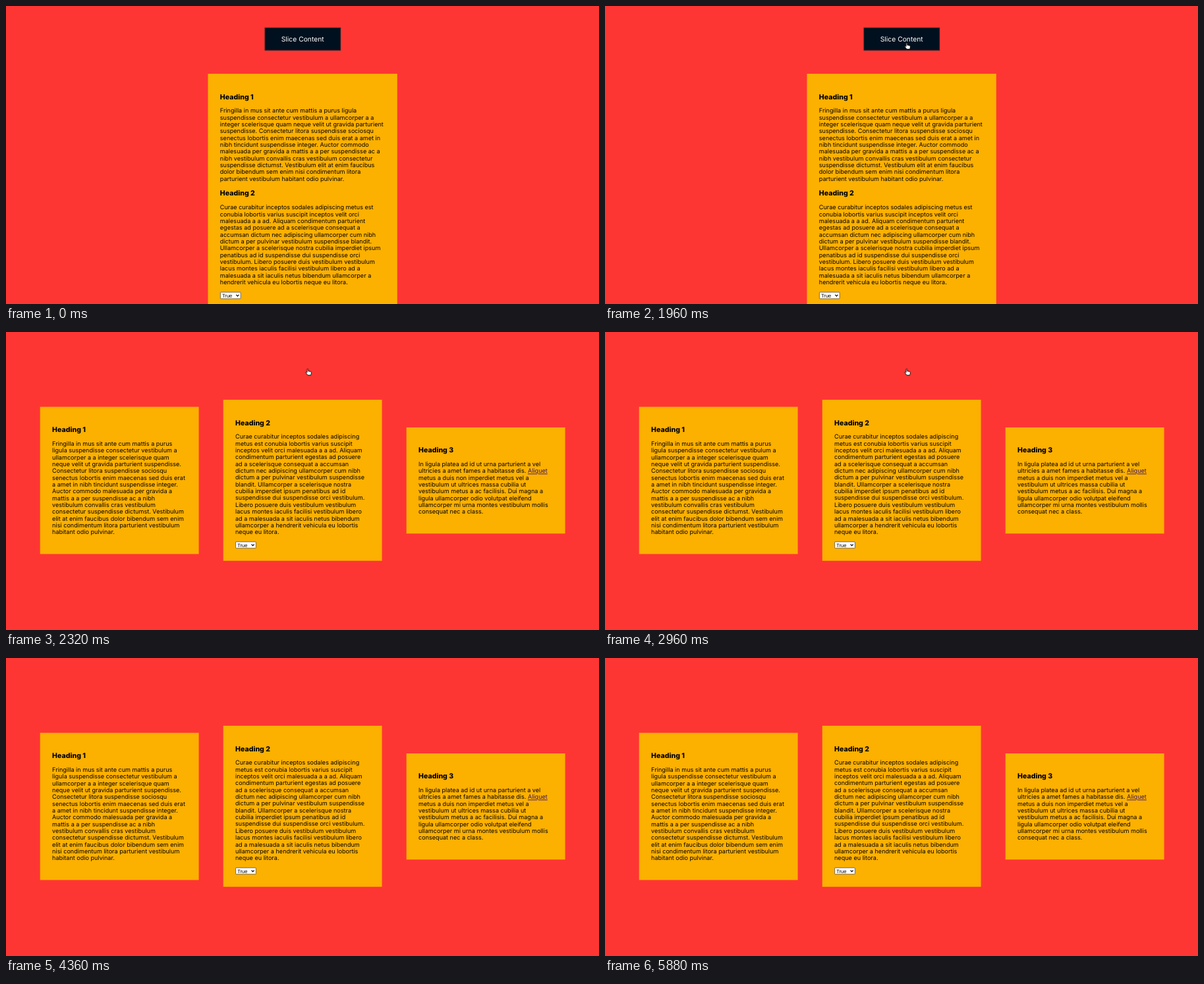
Animation, 900 px wide and 453 px high, one loop 5.92 s. Source, as an HTML page:

```html
<!DOCTYPE html>
<html lang="en">
<head>
<meta charset="utf-8">
<title>Slice Content</title>
<style>
html, body { margin: 0; width: 100%; height: 100%; overflow: hidden; background: #fe3633; }
svg { display: block; width: 900px; height: 453px; }
text { font: 9.08px Inter, "Open Sans", sans-serif; text-rendering: geometricPrecision; white-space: pre; }
.head { font-size: 10.6px; font-weight: 800; }
.label { font-size: 10.3px; fill: #fff; text-anchor: middle; }
.option { font: 7.6px "Liberation Sans", Arial, sans-serif; }
.link { fill: #3d1468; text-decoration: underline; }
.card { fill: #fcb000; }

#whole, #slices, #cursor, #arrow, #hand { animation: 5920ms infinite; }
#whole { animation-name: before; animation-timing-function: step-end; }
#slices { animation-name: after; animation-timing-function: step-end; }
#cursor { animation-name: travel; animation-timing-function: linear; }
#arrow { animation-name: pointing; animation-timing-function: step-end; }
#hand { animation-name: grabbing; animation-timing-function: step-end; }

@keyframes before { 0% { opacity: 1; } 38.85%, 100% { opacity: 0; } }
@keyframes after { 0% { opacity: 0; } 38.85%, 100% { opacity: 1; } }
@keyframes pointing { 0% { opacity: 1; } 18.3% { opacity: 0; } 54.8%, 100% { opacity: 1; } }
@keyframes grabbing { 0% { opacity: 0; } 18.3% { opacity: 1; } 54.8%, 100% { opacity: 0; } }
@keyframes travel {
  0%, 5.9% { transform: translate(620px, -12px); }
  10.14% { transform: translate(581px, 37.5px); }
  15.54% { transform: translate(540px, 55.3px); animation-timing-function: ease-out; }
  25.7%, 54.7% { transform: translate(457.8px, 56px); }
  61.8%, 100% { transform: translate(500px, -14px); }
}
</style>
</head>
<body>
<svg viewBox="0 0 900 453">
  <defs>
    <g id="select">
      <rect x=".4" y=".4" width="30.8" height="9.8" rx=".8" fill="#fff" stroke="#5c5340" stroke-width=".8"/>
      <text class="option" x="3" y="8">True</text>
      <path d="M24.4 4.2l2 2.2 2-2.2" fill="none" stroke="#000" stroke-width="1.2"/>
    </g>
  </defs>
  <rect width="900" height="453" fill="#fe3633"/>

  <g id="whole">
    <rect x="393" y="33.2" width="114.7" height="34" fill="#01101e" stroke="#26252b"/>
    <text class="label" x="450.2" y="53.6">Slice Content</text>
    <rect class="card" x="306.5" y="103" width="287.3" height="360"/>
    <use href="#select" x="325" y="434.7"/>
  </g>

  <g id="slices">
    <rect class="card" x="51.7" y="113.7" width="240.9" height="223.8"/>
    <rect class="card" x="329.7" y="103" width="240.9" height="244.8"/>
    <rect class="card" x="607.7" y="145" width="240.9" height="161.4"/>
    <use href="#select" x="348.2" y="318.5"/>
  </g>

  <g id="cursor">
    <path id="arrow" d="M0 0V8.4L1.9 6.6 3.2 9.8 4.8 9.1 3.5 6H6.1Z" fill="#000" stroke="#fff" stroke-width=".7"/>
    <path id="hand" d="M-.9 .9a.9 .9 0 0 1 1.8 0V3.4L4.6 4.2q.9 .2 .9 1.2V7q0 .9-.6 1.7V9.7H.2L-2.6 6q-.5-.9 .2-1.2 .6-.2 1.5 .8Z" fill="#fff" stroke="#000" stroke-width=".9"/>
  </g>
</svg>

<script>
const LINE = 10.35;
const NS = "http://www.w3.org/2000/svg";

function write(parent, x, y, markup, className) {
  const text = document.createElementNS(NS, "text");
  text.setAttribute("x", x);
  text.setAttribute("y", y);
  if (className) text.setAttribute("class", className);
  text.innerHTML = markup;
  parent.append(text);
}

// y is the baseline of the heading; body lines follow below it.
function section(parent, x, y, title, body) {
  write(parent, x, y, title, "head");
  body.trim().split("\n").forEach((line, i) => write(parent, x, y + 20.8 + i * LINE, line.trim()));
}

const whole = document.getElementById("whole");
const slices = document.getElementById("slices");

section(whole, 324.8, 141.5, "Heading 1", `
  Fringilla in mus sit ante cum mattis a purus ligula
  suspendisse consectetur vestibulum a ullamcorper a a
  integer scelerisque quam neque velit ut gravida parturient
  suspendisse. Consectetur litora suspendisse sociosqu
  senectus lobortis enim maecenas sed duis erat a amet in
  nibh tincidunt suspendisse integer. Auctor commodo
  malesuada per gravida a mattis a a per suspendisse ac a
  nibh vestibulum convallis cras vestibulum consectetur
  suspendisse dictumst. Vestibulum elit at enim faucibus
  dolor bibendum sem enim nisi condimentum litora
  parturient vestibulum habitant odio pulvinar.`);

section(whole, 324.8, 288.4, "Heading 2", `
  Curae curabitur inceptos sodales adipiscing metus est
  conubia lobortis varius suscipit inceptos velit orci
  malesuada a a ad. Aliquam condimentum parturient
  egestas ad posuere ad a scelerisque consequat a
  accumsan dictum nec adipiscing ullamcorper cum nibh
  dictum a per pulvinar vestibulum suspendisse blandit.
  Ullamcorper a scelerisque nostra cubilia imperdiet ipsum
  penatibus ad id suspendisse dui suspendisse orci
  vestibulum. Libero posuere duis vestibulum vestibulum
  lacus montes iaculis facilisi vestibulum libero ad a
  malesuada a sit iaculis netus bibendum ullamcorper a
  hendrerit vehicula eu lobortis neque eu litora.`);

section(slices, 70.1, 152, "Heading 1", `
  Fringilla in mus sit ante cum mattis a purus
  ligula suspendisse consectetur vestibulum a
  ullamcorper a a integer scelerisque quam
  neque velit ut gravida parturient suspendisse.
  Consectetur litora suspendisse sociosqu
  senectus lobortis enim maecenas sed duis erat
  a amet in nibh tincidunt suspendisse integer.
  Auctor commodo malesuada per gravida a
  mattis a a per suspendisse ac a nibh
  vestibulum convallis cras vestibulum
  consectetur suspendisse dictumst. Vestibulum
  elit at enim faucibus dolor bibendum sem enim
  nisi condimentum litora parturient vestibulum
  habitant odio pulvinar.`);

section(slices, 348, 141.5, "Heading 2", `
  Curae curabitur inceptos sodales adipiscing
  metus est conubia lobortis varius suscipit
  inceptos velit orci malesuada a a ad. Aliquam
  condimentum parturient egestas ad posuere
  ad a scelerisque consequat a accumsan
  dictum nec adipiscing ullamcorper cum nibh
  dictum a per pulvinar vestibulum suspendisse
  blandit. Ullamcorper a scelerisque nostra
  cubilia imperdiet ipsum penatibus ad id
  suspendisse dui suspendisse orci vestibulum.
  Libero posuere duis vestibulum vestibulum
  lacus montes iaculis facilisi vestibulum libero
  ad a malesuada a sit iaculis netus bibendum
  ullamcorper a hendrerit vehicula eu lobortis
  neque eu litora.`);

section(slices, 626, 183.2, "Heading 3", `
  In ligula platea ad id ut urna parturient a vel
  ultricies a amet fames a habitasse dis. <tspan class="link">Aliquet</tspan>
  metus a duis non imperdiet metus vel a
  vestibulum ut ultrices massa cubilia ut
  vestibulum metus a ac facilisis. Dui magna a
  ligula ullamcorper odio volutpat eleifend
  ullamcorper mi urna montes vestibulum mollis
  consequat nec a class.`);
</script>
</body>
</html>
```
